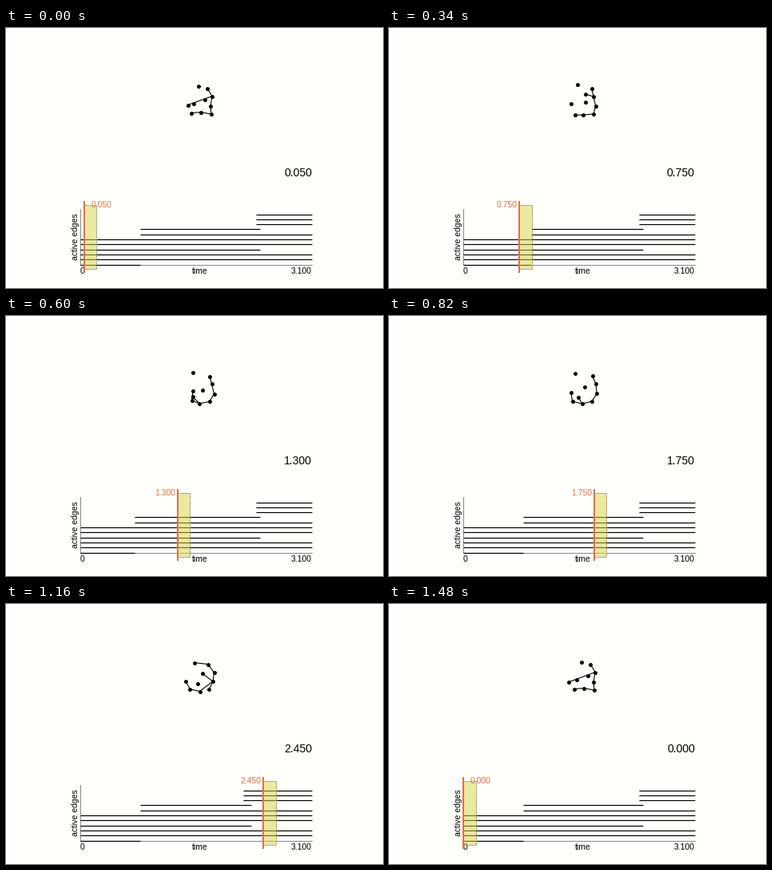
Recreate the animation shown at these times as a matplotlib script. Size 472 px wide and 326 px high, loop 1.5 s.

```python
import numpy as np
import matplotlib.pyplot as plt
from matplotlib.animation import FuncAnimation
from matplotlib.collections import LineCollection
from matplotlib.patches import Rectangle

W, H, DPI = 472, 326, 64
FRAMES, STEP_MS = 75, 20
PT = 72 / DPI

T_MAX, T_STEP, STEPS = 3.1, 0.05, 62
LEFT, RIGHT, BASE = 93, 383, 297
WINDOW = 15.5
LENS_RADIUS, LENS_POWER = 57, 3
SLIDER = "#e66f40"

# Edges per lifetime, listed from the top row of the timeline
EARLY, LATE, CUT = 0.8, 2.35, 2.4
LIVES = [
    ("CA DZ DF", LATE, T_MAX), ("FY", EARLY, CUT), ("GX", EARLY, T_MAX),
    ("AB BD", 0, T_MAX), ("EF", 0, CUT), ("DE FG", 0, T_MAX),
    ("BX", 0, EARLY),
]
EDGES = [(e, a, b) for names, a, b in LIVES for e in names.split()]
ROWS = 233.5 + 6.32 * np.arange(len(EDGES))

# Turning points of each node: (frame, x, y)
KEYS = {
    "C": [(0, 241, 73), (17, 236, 71), (41, 233, 72), (58, 235.5, 73.5)],
    "A": [(0, 252, 75.5), (30, 255, 75.5)],
    "B": [(0, 258, 85.5), (9, 255.5, 86), (41, 259, 85), (58, 260.5, 86)],
    "D": [(0, 256, 98), (30, 260.5, 97.5), (58, 259, 97)],
    "E": [(0, 257, 108), (50, 253.5, 107)],
    "F": [(0, 244, 105.5), (9, 243.5, 108.5), (41, 242, 110),
          (58, 242.5, 109.5)],
    "G": [(0, 232, 106.5), (17, 233, 109), (30, 232.5, 106),
          (41, 229.5, 107)],
    "X": [(0, 227.5, 96.5), (9, 243.5, 85), (17, 245.5, 83), (30, 234, 94),
          (41, 228, 96), (58, 225, 97), (74, 224.5, 98)],
    "Y": [(0, 235, 95), (17, 227.5, 94.5), (30, 233.5, 101),
          (41, 236.5, 101.5), (58, 239.5, 100)],
    "Z": [(0, 249, 90), (17, 245.5, 93), (30, 245.5, 92.5), (41, 245, 89),
          (58, 245.5, 87)],
}


def smooth_path(keys):
    """Periodic monotone cubic through the keys, sampled at every frame."""
    keys = np.array(keys, float)
    at, pos = keys[:, 0], keys[:, 1:]
    gap = np.diff(np.append(at, FRAMES))
    rate = (np.roll(pos, -1, axis=0) - pos) / gap[:, None]
    prev = np.roll(rate, 1, axis=0)
    same = prev * rate > 0
    slope = np.where(same, 2 * prev * rate / np.where(same, prev + rate, 1), 0)
    n = np.arange(FRAMES)
    i = np.searchsorted(at, n, side="right") - 1
    j = (i + 1) % len(at)
    g = gap[i][:, None]
    u = (n - at[i])[:, None] / g
    return ((1 + 2 * u) * (1 - u) ** 2 * pos[i]
            + u * (1 - u) ** 2 * g * slope[i]
            + u * u * (3 - 2 * u) * pos[j]
            + u * u * (u - 1) * g * slope[j])


PATHS = {name: smooth_path(keys) for name, keys in KEYS.items()}


def to_x(t):
    return LEFT + t * (RIGHT - LEFT) / T_MAX


def lens(x, focus):
    """Push x away from the focus, within the lens radius and the axis."""
    d = abs(x - focus)
    if d < LENS_RADIUS:
        d = (LENS_POWER + 1) * LENS_RADIUS * d / (LENS_POWER * d + LENS_RADIUS)
    return min(max(focus + np.copysign(d, x - focus), LEFT), RIGHT)


def label(x, y, text, size=10.4, **kw):
    return ax.text(x, y, text, fontsize=size * PT, va="baseline", **kw)


plt.rcParams["font.family"] = "Liberation Sans"
fig = plt.figure(figsize=(W / DPI, H / DPI), dpi=DPI, facecolor="#fffffc")
ax = fig.add_axes([0, 0, 1, 1])
ax.set_xlim(0, W)
ax.set_ylim(H, 0)
ax.axis("off")

ax.plot([LEFT, LEFT], [227, BASE], color="#888888", lw=PT, zorder=1)
ax.plot([LEFT, RIGHT], [BASE, BASE], color="#888888", lw=PT, zorder=1)
label(LEFT, 308, "0")
label(243, 308, "time", ha="center")
label(RIGHT, 308, "3.100", ha="right")
label(90.3, 262, "active edges", ha="center", rotation=90,
      rotation_mode="anchor")

bars = LineCollection([], colors="black", linewidths=1.2 * PT, zorder=2,
                      capstyle="butt")
links = LineCollection([], colors="black", linewidths=1.1 * PT, zorder=2)
ax.add_collection(bars)
ax.add_collection(links)
dots, = ax.plot([], [], "o", color="black", ms=5 * PT, mew=0, zorder=3)

brush = Rectangle((0, 222), WINDOW, 80, fc=(0.85, 0.83, 0.3, 0.52),
                  ec="#8a8a80", lw=PT, ls=(0, (2, 1)), zorder=4)
ax.add_patch(brush)
marker, = ax.plot([], [], color=SLIDER, lw=2 * PT, zorder=5,
                  solid_capstyle="butt")
tag = label(0, 225, "", color=SLIDER, zorder=5)
clock = label(RIGHT, 186, "", size=14, ha="right")


def draw(n):
    t = T_STEP * (round(1 + n * STEPS / FRAMES) % STEPS)
    x = to_x(t)

    place = {name: path[n] for name, path in PATHS.items()}
    dots.set_data(*zip(*place.values()))
    links.set_segments([[place[a], place[b]] for (a, b), start, end in EDGES
                        if start <= t + 1e-9 < end])
    bars.set_segments([[(lens(to_x(start), x), y), (lens(to_x(end), x), y)]
                       for (_, start, end), y in zip(EDGES, ROWS)])

    brush.set_x(x)
    brush.set_width(min(WINDOW, RIGHT - x))
    marker.set_data([x, x], [217, 307])
    value = f"{t:.3f}"
    clock.set_text(value)
    tag.set_text(value)
    fits = x - 28 > LEFT
    tag.set_x(x - 2.5 if fits else x + 8.5)
    tag.set_ha("right" if fits else "left")
    return bars, links, dots, brush, marker, tag, clock


anim = FuncAnimation(fig, draw, frames=FRAMES, interval=STEP_MS,
                     repeat=True, repeat_delay=0)
plt.show()
```
